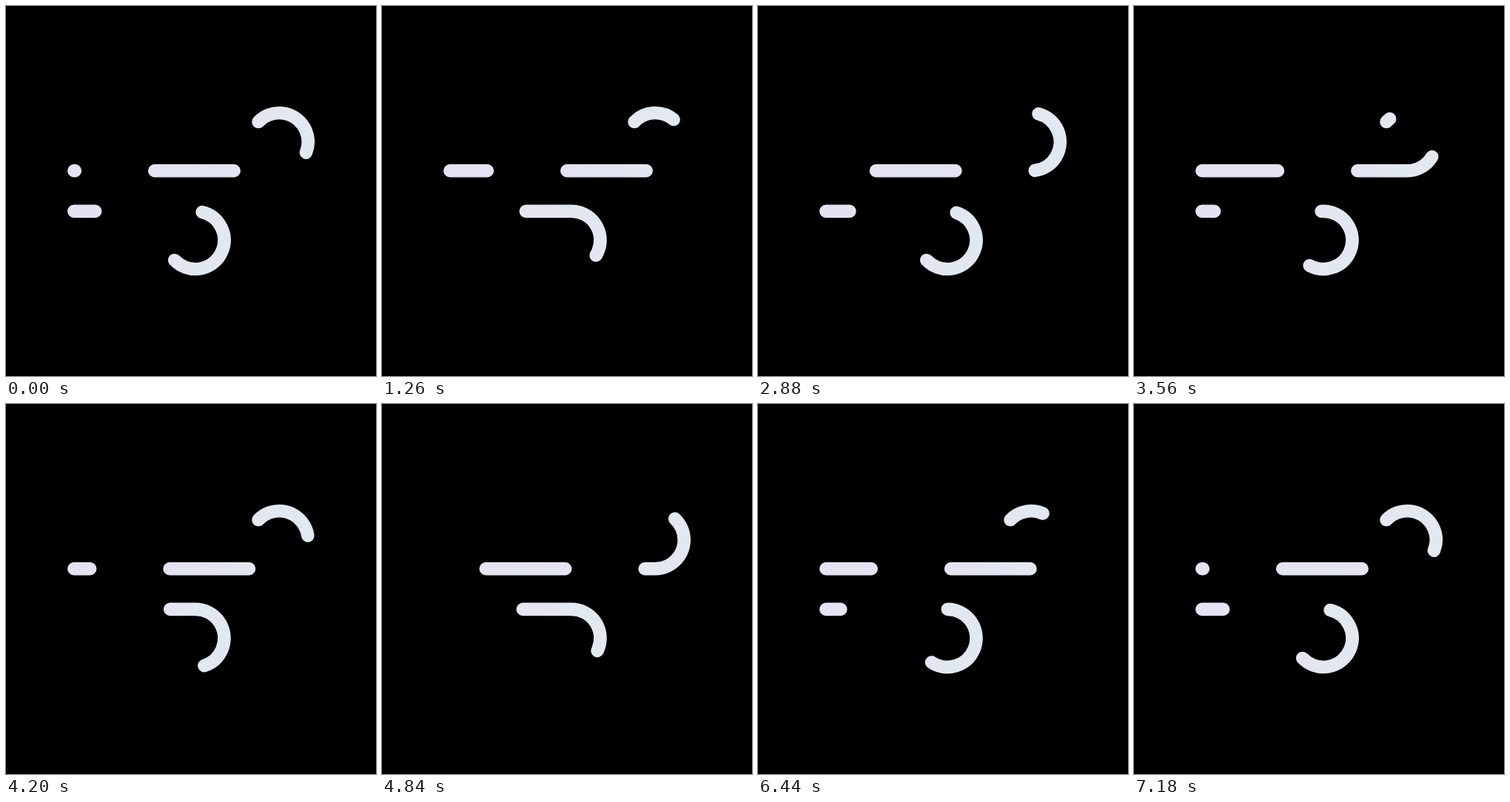
Animation of 500 by 500 pixels, one loop 7.2 s. Source, as an HTML page:

```html
<!DOCTYPE html>
<html lang="en">
<head>
<meta charset="utf-8">
<title>Wind</title>
<style>
  html, body { margin: 0; width: 100%; height: 100%; overflow: hidden; background: #000; }
  svg { display: block; width: 100%; height: 100%; }
  path {
    fill: none;
    stroke-width: 18;
    stroke-linecap: round;
    stroke-linejoin: round;
    /* first and last step share a pose, each step lasts 20 ms */
    animation: blow 7200ms steps(360, jump-none) infinite;
  }
  .upper { stroke: url(#upperTint); stroke-dasharray: 110; --travel: 1540px; }
  .lower { stroke: url(#lowerTint); stroke-dasharray: 148; --travel: 2960px; }
  @keyframes blow {
    from { stroke-dashoffset: 0px; }
    to { stroke-dashoffset: var(--travel); }
  }
</style>
</head>
<body>
<svg viewBox="0 0 512 512">
  <defs>
    <linearGradient id="upperTint" gradientUnits="userSpaceOnUse" x1="94" y1="0" x2="378" y2="0">
      <stop offset="0" stop-color="#e5e3f2"/>
      <stop offset=".65" stop-color="#e3e3f2"/>
      <stop offset="1" stop-color="#e2e8f0"/>
    </linearGradient>
    <linearGradient id="lowerTint" gradientUnits="userSpaceOnUse" x1="94" y1="0" x2="270" y2="0">
      <stop offset="0" stop-color="#e5e3f2"/>
      <stop offset=".65" stop-color="#e5e4f1"/>
      <stop offset="1" stop-color="#e2e8f0"/>
    </linearGradient>
  </defs>
  <path class="upper" d="M349.2 160.3A40 40 0 1 1 378 228H94"/>
  <path class="lower" d="M233.2 351.7A40 40 0 1 0 262 284H94"/>
</svg>
</body>
</html>
```
